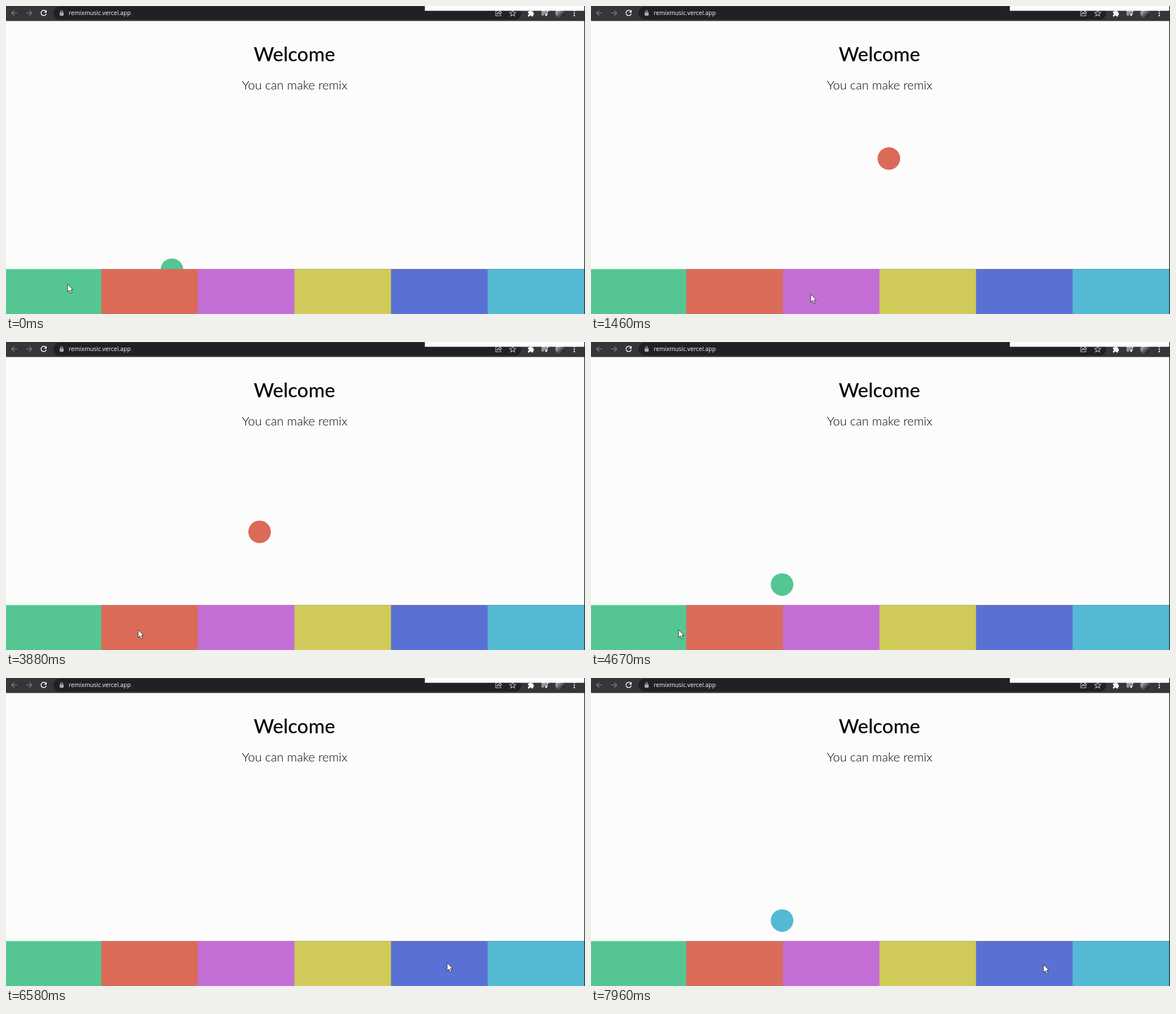
Write an HTML page that moves like this. It is 1025 by 546 pixels and loops after 8 s.

```html
<!DOCTYPE html>
<html lang="en">
<head>
<meta charset="utf-8">
<title>Welcome</title>
<style>
html, body { margin: 0; width: 100%; height: 100%; overflow: hidden; background: #fcfcfd; }
svg { display: block; width: 1025px; height: 546px; }
.title { font: 500 34.8px Lato, sans-serif; text-anchor: middle; }
.subtitle { font: 300 21.9px Lato, sans-serif; text-anchor: middle; }
.address { font: 500 10.5px "Open Sans", sans-serif; fill: #fff; }
.line { fill: none; stroke: #b4b6b8; stroke-width: 1.2; }
.line.dim { stroke: #85878a; }
.line.lock { stroke: #a9abad; }
.line.bright { stroke: #f4f4f4; stroke-width: 1.5; }
.solid { fill: #f4f4f4; }
</style>
</head>
<body>
<svg viewBox="0 0 1025 546">
  <defs>
    <linearGradient id="photo" x2="1" y2="1">
      <stop offset=".25" stop-color="#a3a3a6"/><stop offset=".8" stop-color="#242426"/>
    </linearGradient>
  </defs>
  <rect width="1025" height="546" fill="#fcfcfd"/>

  <g id="toolbar">
    <rect width="1025" height="26.6" fill="#343638"/>
    <rect x="84" y="1" width="828" height="23" rx="11.5" fill="#1f2123"/>
    <path class="line dim" d="M20 12.5H10M14.5 8L10 12.5L14.5 17M35.5 12.5H45.5M41 8L45.5 12.5L41 17"/>
    <path class="line bright" d="M70.3 9.2A4.7 4.7 0 1 0 71.3 13.5"/>
    <path class="solid" d="M72 6.8V11.7H67.1Z"/>
    <rect x="95" y="11.2" width="7" height="6" rx=".8" fill="#a9abad"/>
    <path class="line lock" d="M96.7 11.5V10a1.8 1.8 0 0 1 3.6 0V11.5"/>
    <text class="address" x="111" y="16.3">remixmusic.vercel.app</text>
    <path class="line" d="M870 9H867V17.5H876V14.5M869.5 14.5C870 11.5 872 10.5 874 10.5V8.3L877.5 11.4L874 14.3V12.5C872 12.5 870.8 13 869.5 14.5Z"/>
    <path class="line" d="M897 7.2L898.5 11L902.4 11.2L899.4 13.7L900.4 17.6L897 15.4L893.6 17.6L894.6 13.7L891.6 11.2L895.5 11Z"/>
    <path class="solid" d="M924 9.5H927A1.7 1.7 0 0 1 930.4 9.5H933.2V12.3A1.7 1.7 0 0 1 933.2 15.7V18.4H930.3A1.7 1.7 0 0 0 926.9 18.4H924V15.6A1.7 1.7 0 0 0 924 12.2Z"/>
    <path class="line bright" d="M948 9.5H956M948 12.5H956M948 15.5H952.5M957.7 15.5V9.5H960.5"/>
    <circle class="solid" cx="956.2" cy="15.7" r="1.9"/>
    <circle cx="981" cy="12.5" r="8.5" fill="url(#photo)"/>
    <g class="solid"><circle cx="1006" cy="8.5" r="1.3"/><circle cx="1006" cy="12.7" r="1.3"/><circle cx="1006" cy="16.9" r="1.3"/></g>
    <path d="M741.5 0H1024V8.5H741.5Z" fill="#fdfdfe"/>
  </g>

  <text class="title" x="510.5" y="98">Welcome</text>
  <text class="subtitle" x="511" y="148">You can make remix</text>

  <g id="bubbles"></g>
  <g id="pads"></g>
  <rect x="1023.6" width="1.4" height="546" fill="#2a2b2d"/>
  <path id="cursor" d="M0 0V14L3.2 11.1L5.5 16.4L7.9 15.4L5.6 10.2H9.8Z" fill="#fff" stroke="#222" stroke-width=".9"/>
</svg>
<script>
const LOOP = 8000;
const COLORS = {
  green: '#55c692', red: '#da6b59', purple: '#c36fd6',
  yellow: '#d0cb58', blue: '#5b70d5', cyan: '#54b9d3'
};
// color, time of click; the first bubble is already under way
const JUMPS = [
  ['green', -84], ['red', 1045], ['purple', 2199], ['red', 3664],
  ['green', 4567], ['yellow', 5545], ['blue', 6800], ['cyan', 7909]
];
// time, x, y of the pointer tip
const POINTER = [
  [700, 109, 493], [1000, 250, 505], [1100, 250, 505], [1400, 389, 511],
  [3210, 389, 511], [3460, 234, 510], [4250, 234, 510], [4500, 155, 510],
  [4750, 155, 510], [5270, 595, 507], [6050, 595, 507], [6540, 781, 505],
  [6830, 781, 505], [7110, 914, 508], [7710, 914, 508], [7950, 801, 508]
];

const byId = id => document.getElementById(id);
function add(parent, tag, attributes) {
  const node = document.createElementNS('http://www.w3.org/2000/svg', tag);
  for (const key in attributes) node.setAttribute(key, attributes[key]);
  return byId(parent).appendChild(node);
}

Object.values(COLORS).forEach((fill, i) => {
  const x = i ? 171 * i - 2.4 : 0;
  add('pads', 'rect', { x, y: 466.4, width: 1024 - x, height: 80, fill });
});
const bubbles = JUMPS.map(([color]) => add('bubbles', 'circle', { r: 20, fill: COLORS[color] }));

// The CSS "ease" curve, cubic-bezier(.25, .1, .25, 1)
function ease(x) {
  const bezier = (a, b, s) => 3 * a * s * (1 - s) ** 2 + 3 * b * s * s * (1 - s) + s ** 3;
  let low = 0, high = 1;
  for (let i = 0; i < 20; i++) {
    const mid = (low + high) / 2;
    if (bezier(.25, .25, mid) < x) low = mid; else high = mid;
  }
  return bezier(.1, 1, low);
}

function jumpAge(t, start) {
  if (start < 0) return Math.max(0, t - 130) * .835 - start;
  // Each bubble shows up late, already clear of the pads
  return t - start < 50 ? -1 : Math.max(116, t - start);
}

function pointerAt(t) {
  const next = POINTER.findIndex(p => p[0] > t);
  if (next < 0) return POINTER[POINTER.length - 1].slice(1);
  if (next === 0) return POINTER[0].slice(1);
  const [t0, x0, y0] = POINTER[next - 1], [t1, x1, y1] = POINTER[next];
  const u = (t - t0) / (t1 - t0), k = u * u * (3 - 2 * u);
  return [x0 + (x1 - x0) * k, y0 + (y1 - y0) * k];
}

function draw(t) {
  bubbles.forEach((bubble, i) => {
    const age = jumpAge(t, JUMPS[i][1]);
    const shown = age >= 0 && age < 1000;
    bubble.style.display = shown ? '' : 'none';
    if (!shown) return;
    const rising = age < 500;
    const p = ease((age % 500) / 500);
    bubble.setAttribute('cx', (rising ? 225 : 532.5) + 307.5 * p);
    bubble.setAttribute('cy', 525.5 - 259.5 * (rising ? p : 1 - p));
  });
  byId('cursor').setAttribute('transform', `translate(${pointerAt(t)})`);
}

const begin = performance.now();
function tick() {
  draw((performance.now() - begin) % LOOP);
  requestAnimationFrame(tick);
}
tick();
</script>
</body>
</html>
```
